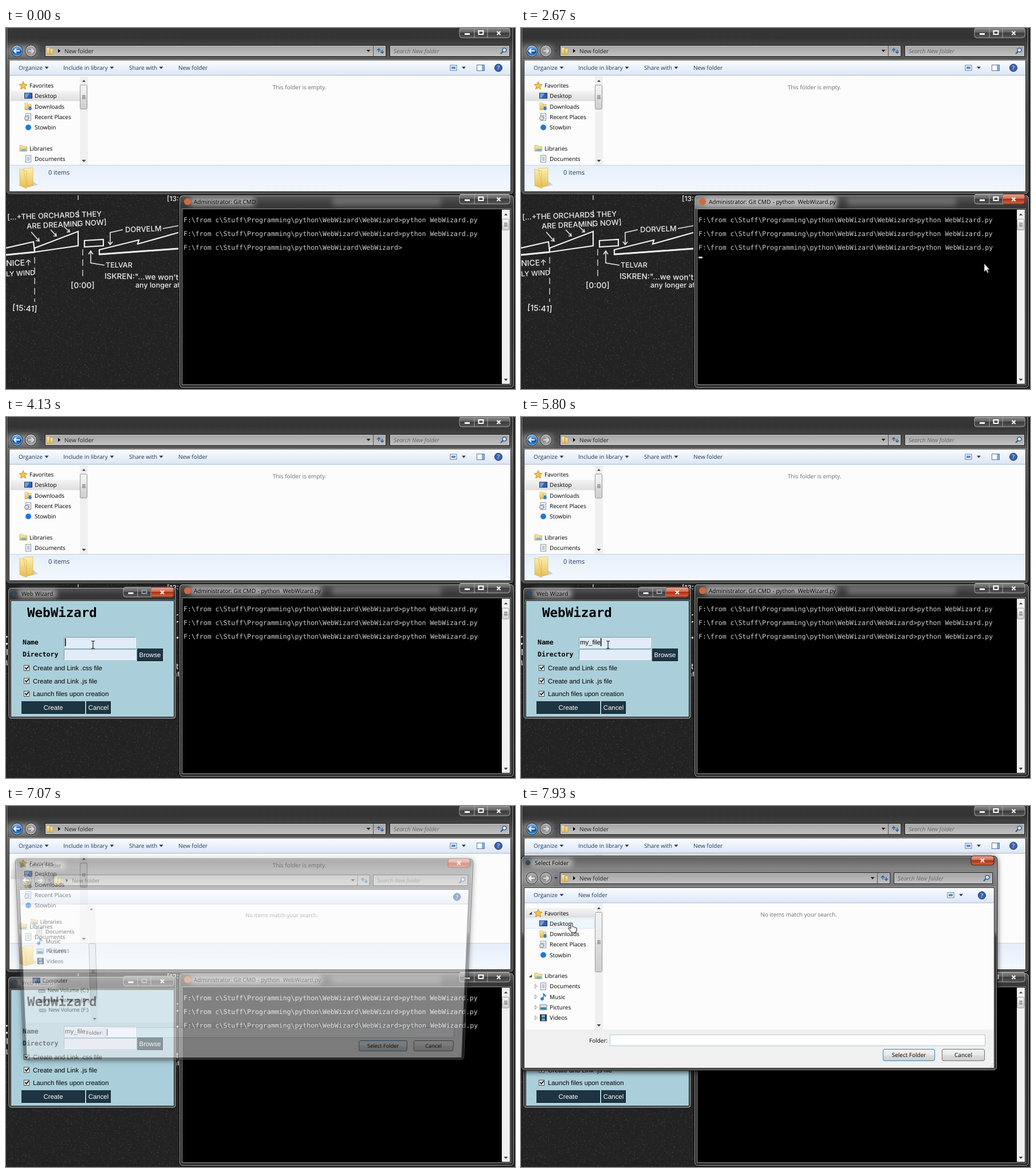
These frames come from a looping animation (889x630 px, 8000 ms). An HTML page:

```html
<!DOCTYPE html>
<html lang="en">
<head>
<meta charset="utf-8">
<title>Web Wizard demo</title>
<style>
html, body { margin: 0; width: 100%; height: 100%; overflow: hidden; background: #202020; }
div, svg { position: absolute; left: 0; top: 0; width: 889px; height: 630px; }
#wizard { transform-origin: 150.5px 412.5px; }
#dialog { transform-origin: 416px 274.5px; filter: drop-shadow(0 2px 5px #000b); }
text { font: 10px "Open Sans", "Noto Sans", sans-serif; white-space: pre; text-rendering: geometricPrecision; }
.mono { font: 11.54px "DejaVu Sans Mono", monospace; fill: #cfcfcf; }
.bold { font: bold 11.5px "DejaVu Sans Mono", monospace; }
.head { font: bold 22.5px "DejaVu Sans Mono", monospace; }
.tk { font: 11.35px "Liberation Sans", Arial, sans-serif; }
.hint { font-style: italic; fill: #666; }
.soft { fill: #6d6d6d; }
.bar { fill: #1e395b; }
.items { font-size: 10.9px; fill: #1e395b; }
.mid { text-anchor: middle; }
.white { fill: #fff; }
.chalk { font: 500 12px Inter, "Open Sans", sans-serif; fill: #eee; }
</style>
</head>
<body>
<svg id="desk"></svg>
<div id="wizard"></div>
<div id="dialog"></div>
<svg id="top"></svg>
<script>
const $ = id => document.getElementById(id);
const rect = (x, y, w, h, fill, more = '') =>
  `<rect x="${x}" y="${y}" width="${w}" height="${h}" fill="${fill}" ${more}/>`;
const path = (d, more = '') => `<path d="${d}" ${more}/>`;
const circle = (x, y, r, fill, more = '') => `<circle cx="${x}" cy="${y}" r="${r}" fill="${fill}" ${more}/>`;
const group = (id, body, more = '') => `<g id="${id}" ${more}>${body}</g>`;
// y is the vertical middle of the line
const text = (x, y, s, cls = '', more = '') =>
  `<text x="${x}" y="${y + 3.6}" class="${cls}" ${more}>${s}</text>`;
const line = (d, color = '#333', width = 1) =>
  path(d, `fill="none" stroke="${color}" stroke-width="${width}"`);
const grad = (id, ...stops) => `<linearGradient id="${id}" x2="0" y2="1">${stops.map(([o, c]) =>
  `<stop offset="${o}" stop-color="${c}"/>`).join('')}</linearGradient>`;
const down = (x, y, fill = '#1e395b') => path(`M${x - 3.5} ${y - 2}h7l-3.5 4z`, `fill="${fill}"`);
const up = (x, y) => path(`M${x - 3} ${y + 2}h6l-3 -3.5z`, 'fill="#444"');

const defs = `<defs>
${grad('dark', [0, '#3a3a3a'], [.08, '#333'], [.14, '#484848'], [.2, '#585858'], [.26, '#484848'], [.5, '#2c2c2c'], [1, '#303030'])}
${grad('pane', [0, '#5a5a5a'], [.05, '#3a3a3a'], [.1, '#333'], [.3, '#2a2a2a'], [1, '#303030'])}
${grad('mist', [0, '#5c5c5c'], [.06, '#858585'], [.15, '#777'], [.35, '#6a6a6a'], [.38, '#242424'], [1, '#1c1c1c'])}
${grad('field', [0, '#a4a4a4'], [1, '#c2c2c2'])}
${grad('tools', [0, '#fbfdff'], [.5, '#eaf1fa'], [1, '#dce6f4'])}
${grad('info', [0, '#e6effa'], [1, '#f3f8fe'])}
${grad('button', [0, '#f3f3f3'], [.5, '#e9e9e9'], [.52, '#dcdcdc'], [1, '#cfcfcf'])}
${grad('caption', [0, '#8a8a8a'], [.45, '#626262'], [.5, '#3c3c3c'], [1, '#555'])}
${grad('red', [0, '#e5aa9b'], [.45, '#cf6d55'], [.5, '#ae2e12'], [1, '#d26a45'])}
${grad('blue', [0, '#8fbcec'], [.5, '#2f6fc4'], [.52, '#1047a0'], [1, '#2f9be0'])}
${grad('grey', [0, '#b5b5b5'], [.5, '#8a8a8a'], [1, '#a9a9a9'])}
${grad('row', [0, '#f4f4f4'], [1, '#dedede'])}
${grad('folder', [0, '#fdf0b0'], [1, '#e5bd4f'])}
<filter id="blur" x="-20%" y="-100%" width="140%" height="300%"><feGaussianBlur stdDeviation="5"/></filter>
<filter id="grain" x="0" y="0" width="100%" height="100%"><feTurbulence baseFrequency=".3" numOctaves="2" seed="4"/>
<feColorMatrix values="0 0 0 0 1 0 0 0 0 1 0 0 0 0 1 .5 0 0 0 -.17"/></filter>
<clipPath id="navClip">${rect(6, 170, 123, 220, '#000')}</clipPath>
<clipPath id="listClip">${rect(6, 84, 123, 155, '#000')}</clipPath>
<clipPath id="titleClip">${rect(304, 293, 582, 23, '#000')}</clipPath>
</defs>`;

// ---- window parts ----
const frame = (x, y, w, h, fill) =>
  rect(x + .5, y + .5, w - 1, h - 1, fill, 'rx="6" stroke="#000"') +
  rect(x + 1.5, y + 1.5, w - 3, h - 3, 'none', 'rx="5" stroke="#fff" stroke-opacity=".55"');
// client area with the thin double edge of the glass around it
const client = (x, y, w, h, fill) =>
  rect(x - 1.5, y - 1.5, w + 3, h + 3, 'none', 'stroke="#fff" stroke-opacity=".4"') +
  rect(x - .5, y - .5, w + 1, h + 1, fill, 'stroke="#1a1a1a"');
const glow = (x, y, w) => rect(x, y - 7, w, 14, '#ccc', 'opacity=".75" filter="url(#blur)"');
const cross = (x, y) => line(`M${x - 3} ${y - 3}l6 6m0 -6l-6 6`, '#fff', 2);
function caption(x, y, a, b, w, closeId, faint) {
  return rect(x, y, w, 17, 'url(#caption)', 'rx="4" stroke="#bbb" stroke-opacity=".8"') +
    (closeId ? group(closeId, rect(x + b, y, w - b, 17, 'url(#red)', 'rx="3" stroke="#5a1508"')) : '') +
    line(`M${x + a} ${y}v17M${x + b} ${y}v17`, '#aaa') +
    rect(x + a / 2 - 4, y + 9, 9, 3, '#fff') +
    rect(x + (a + b) / 2 - 4, y + 5, 8, 6, 'none', `stroke="${faint ? '#999' : '#fff'}" stroke-width="2"`) +
    cross(x + (b + w) / 2, y + 9);
}
const smallFolder = (x, y) => path(`M${x - 5} ${y - 6}h5v12h-5zM${x + 1} ${y - 4}h5v10h-5z`, 'fill="url(#folder)" stroke="#b48a2c" stroke-width=".5"');

function address(y, end, right, back) {
  const nav = (x, fill) => circle(x, y, 10, fill, 'stroke="#222" stroke-width="1"') +
    circle(x, y, 9, 'none', 'stroke="#ddd" stroke-opacity=".7"');
  return rect(4, y - 9, 50, 18, '#bbb', 'opacity=".6" filter="url(#blur)"') +
    nav(19, back) + nav(43.5, 'url(#grey)') +
    line(`M24 ${y}h-10m4 -4l-4 4l4 4`, '#fff', 2.2) +
    line(`M39 ${y}h9m-4 -4l4 4l-4 4`, '#ddd', 2.2) +
    down(61, y, '#244a80') +
    rect(68.5, y - 9.5, end - 69, 19, 'url(#field)', 'stroke="#222"') +
    rect(69.5, y - 8.5, end - 71, 17, 'none', 'stroke="#ddd" stroke-opacity=".7"') +
    line(`M${end - 22.5} ${y - 9}v18`, '#555') +
    smallFolder(76, y) + path(`M91 ${y - 3.5}v7l4 -3.5z`) +
    text(102, y, 'New folder', '', 'fill="#222"') + down(end - 31, y, '#222') +
    line(`M${end - 16} ${y - 1}l3 -3l3 3m-3 -3v6M${end - 10} ${y + 1}l3 3l3 -3m-3 3v-6`, '#2b62a5', 1.5) +
    rect(end + 6.5, y - 9.5, right - end - 7, 19, 'url(#field)', 'stroke="#222"') +
    rect(end + 7.5, y - 8.5, right - end - 9, 17, 'none', 'stroke="#ddd" stroke-opacity=".7"') +
    text(end + 13, y, 'Search New folder', 'hint') +
    circle(right - 9.5, y - 1.5, 3.4, '#dbe8f5', 'stroke="#2a5592" stroke-width="1.4"') +
    line(`M${right - 12} ${y + 1}l-4 4`, '#2a5592', 2);
}
const toolbar = (y, right, help) => rect(6, y - 13, right - 6, 26, 'url(#tools)') +
  line(`M6 ${y + 13}h${right - 6}`, '#a9bbd2') +
  circle(help, y, 6.5, '#3a62b0', 'stroke="#1b2f63"') + text(help, y, '?', 'mid white', 'font-weight="bold"');
const menu = (y, items, view) =>
  items.map(([x, s, arrow]) => text(x, y, s, 'bar') + (arrow ? down(arrow, y) : '')).join('') +
  rect(view - 5, y - 4.5, 11, 9, '#fff', 'stroke="#5c7596"') + rect(view - 3, y - 2, 7, 4, '#4a8ad0') +
  down(view + 18.5, y);
const paper = (x, y) => rect(x - 4.5, y - 6, 9, 12, '#fbfbfb', 'stroke="#8a8f99"') +
  line(`M${x - 2.5} ${y - 2.5}h5m-5 2.5h5m-5 2.5h5`, '#5d87b8');
const screen = (x, y) => rect(x - 6.5, y - 5, 13, 9, '#2a62bd', 'stroke="#1f2d4a"') +
  path(`M${x - 6} ${y - 4.5}h8l-5 8h-3z`, 'fill="#6fa0e4"');
const wide = (x, y) => path(`M${x - 6} ${y - 5}h5l1.5 2h6v8h-12.5z`, 'fill="url(#folder)" stroke="#b48a2c" stroke-width=".6"');
const icons = {
  Favorites: (x, y) => path(`M${x} ${y - 7}l2 4.6l5 .5l-3.8 3.3l1.2 5l-4.4 -2.7l-4.4 2.7l1.2 -5l-3.8 -3.3l5 -.5z`, 'fill="#f8c63c" stroke="#b9791a" stroke-width=".8"'),
  Desktop: screen,
  Downloads: (x, y) => smallFolder(x - 1, y) + path(`M${x + 1} ${y}h4v3h2l-4 4l-4 -4h2z`, 'fill="#2f7fd6"'),
  'Recent Places': (x, y) => paper(x, y) + circle(x - 3, y + 2, 3.5, '#dfe3e8', 'stroke="#777"'),
  Stowbin: (x, y) => circle(x, y, 5, '#1f78e0'),
  Libraries: (x, y) => wide(x, y) + rect(x - 3, y + 1, 8, 4, '#6fb4e6'),
  Documents: paper,
  Music: (x, y) => circle(x - 2, y + 3.5, 3, '#2f86d8') + path(`M${x - .5} ${y - 7}l5 4v4l-3.5 -3v6h-1.5z`, 'fill="#2f86d8"'),
  Pictures: (x, y) => rect(x - 6, y - 4.5, 12, 9, '#cfe6f6', 'stroke="#7d8b99"') + rect(x - 5, y, 10, 4, '#3f8a86'),
  Videos: (x, y) => rect(x - 6, y - 6, 12, 12, '#2b3340') + rect(x - 3, y - 5, 6, 4.5, '#6ea6d6') + rect(x - 3, y + 1, 6, 4, '#6ea6d6'),
  Computer: screen,
  drive: (x, y) => rect(x - 6, y - 1, 12, 5, '#b8bec6', 'rx="1" stroke="#666"')
};
// empty names leave a gap; headings sit further left
const heads = ['Favorites', 'Libraries', 'Computer'];
const favs = ['Favorites', 'Desktop', 'Downloads', 'Recent Places', 'Stowbin', ''];
const libs = ['Libraries', 'Documents', 'Music', 'Pictures', 'Videos'];
const tree = (y0, names) => names.map((s, i) => {
  if (!s) return '';
  const y = y0 + i * 18.25, head = heads.includes(s);
  return (icons[s] || icons.drive)(head ? 30 : 39, y) + text(head ? 41 : 50, y, s);
}).join('');
const scroll = (x, y, h, at, len, id = '') => rect(x, y, 14, h, '#f0f0f0') + up(x + 7, y + 8) + down(x + 7, y + h - 7, '#444') +
  group(id, rect(x + .5, at + .5, 12, len, 'url(#button)', 'rx="2" stroke="#999"') +
    line(`M${x + 4} ${at + len / 2 - 2}h6m-6 2.5h6m-6 2.5h6`, '#555'));

// ---- desktop ----
const say = (x, y, s, size, turn = 0) => text(x, y, s, 'chalk', `style="font-size:${size}px" transform="rotate(${turn} ${x} ${y})"`);
const wallpaper = rect(0, 0, 889, 630, '#222') + rect(0, 288, 304, 342, '#fff', 'filter="url(#grain)" opacity=".6"') +
  say(2, 331, '[...+THE ORCHARDS THEY', 13, -2) + say(36, 347, 'ARE DREAMING NOW]', 13, -3) +
  say(281, 298, '[13:', 12) + say(208, 353, 'DORVELM', 13, -2) + say(174, 414, 'TELVAR', 12.5) +
  say(172, 434, 'ISKREN:"...we won\'t', 13.5, 1) + say(226, 449, 'any longer at', 12.5) +
  say(0, 412, 'NICE↑', 14, -2) + say(0, 430, 'LY WIND', 12, -3) +
  say(113, 450, '[0:00]', 14) + say(11, 489, '[15:41]', 14, 4) +
  line('M0 384L48 373L50 391L0 396M50 384L126 355V380L50 391ZM137 371L170 369V380L137 382ZM301 385L163 395V387L232 370L230 377L301 357', '#eee', 2.2) +
  line('M0 396L50 391M163 395L301 385', '#eee', 3) +
  line('M274 350L301 345M204 352L182 357V378m-4 -5l4 5l4 -5M172 414L148 410V389m-4 6l4 -6l4 6M44 356l14 16m-1 -6l1 6l-6 -1M78 352l10 11m-1 -5l1 5l-5 0M102 347l9 9m-1 -5l1 5l-5 0', '#e4e4e4', 1.6) +
  path('M126 292V300M126 318V352M50 400V478M134 386V440', 'stroke="#ccc" stroke-width="1.5" stroke-dasharray="11 7"');

const explorer = frame(0, -8, 887, 299, 'url(#dark)') + caption(792, 0, 26, 49, 88) +
  address(40, 664, 880, 'url(#blue)') + client(6, 57, 875, 228, '#fcfcfc') +
  toolbar(69.5, 881, 860) +
  menu(69.5, [[22, 'Organize', 71], [100, 'Include in library', 185], [215, 'Share with', 271], [301, 'New folder']], 781) +
  rect(822.5, 64.5, 13, 10, '#fff', 'stroke="#5c7596"') + rect(831, 65, 4, 9, '#7fb0e0') +
  rect(7, 109.5, 122, 18, 'url(#row)') +
  `<g clip-path="url(#listClip)">${tree(100.5, [...favs, ...libs])}</g>` + scroll(129, 84, 155, 99, 42) +
  text(512.5, 103, 'This folder is empty.', 'soft mid') +
  rect(6, 239, 875, 46, 'url(#info)') + line('M6 239.5h875', '#c5d3e6') +
  path('M36 278L56 274L46 266z', 'fill="#ccd0d4"') +
  path('M30 245l17 -1v31l-10 3zM24 246l12 4v30l-12 -5z', 'fill="url(#folder)" stroke="#d6ae4a" stroke-width=".6"') +
  text(74, 252, '0 items', 'items');

const prompt = 'F:\\from c\\Stuff\\Programming\\python\\WebWizard\\WebWizard&gt;', command = 'python WebWizard.py';
const terminal = frame(302, 291, 586, 338, 'url(#pane)') +
  `<g clip-path="url(#titleClip)">${rect(570, 296, 190, 14, '#999', 'opacity=".5" filter="url(#blur)"')}${
    group('lit', rect(300, 293, 250, 24, '#ddd', 'opacity=".55" filter="url(#blur)"'))}${
    glow(322, 303, 112)}${group('wideGlow', glow(430, 303, 120))}</g>` +
  circle(317, 303, 6, '#cf6a3c') + text(328, 303, 'Administrator: Git CMD') +
  text(437, 303, ' - python  WebWizard.py', '', 'id="running"') +
  caption(792, 290, 26, 49, 88, 'cmdClose') +
  client(309, 317, 571, 304, '#000') + scroll(866, 317, 304, 333, 19) +
  [335, 359.4].map(y => text(310, y, prompt + command, 'mono')).join('') + text(310, 383.8, prompt, 'mono') +
  text(692.3, 383.8, command, 'mono', 'id="typed"') + rect(0, 0, 7, 3, '#d2d2d2', 'id="block"');

// ---- pop-up windows ----
const check = (y, s) => rect(31.5, y - 4.5, 9, 9, '#fff', 'stroke="#444"') +
  line(`M33.5 ${y - 1}l2 3l4 -5`, '#000', 1.8) + text(47, y + .4, s, 'tk');
const dark = (x, y, w, s) => rect(x, y, w, 22, '#1d3442') + line(`M${x} ${y + 21.5}h${w - .5}v-21`, '#0c1a22') +
  text(x + w / 2, y + 11.3, s, 'tk mid white');
const entry = y => rect(101.5, y, 125, 18, '#e2ebf7', 'stroke="#f7fafc"') + line(`M101.5 ${y + 18}v-18h125`, '#7c98a2');
const wizard = frame(3, 297, 295, 231, 'url(#pane)') + glow(22, 308, 66) +
  circle(15, 308, 4.5, '#31475e') + text(27, 308, 'Web Wizard') + caption(205, 297, 25, 48, 88, 'wizClose', true) +
  client(9, 321, 284, 202, '#abcfda') +
  `<text x="37" y="349" class="head">WebWizard</text>` +
  text(29, 393, 'Name', 'bold') + text(29, 414, 'Directory', 'bold') + entry(384.5) + entry(405.5) +
  text(103, 393.6, '', 'tk', 'id="name"') + rect(103, 386, 1.5, 14, '#000', 'id="caret"') +
  dark(229, 404, 45, 'Browse') +
  check(438, 'Create and Link .css file') + check(460.5, 'Create and Link .js file') +
  check(483, 'Launch files upon creation') + dark(27, 496, 111, 'Create') + dark(140, 496, 43, 'Cancel');

const push = (x, w, s, stroke) => rect(x + .5, 424.5, w, 20, 'url(#button)', `rx="2.5" stroke="${stroke}"`) +
  text(x + w / 2 + .5, 434.5, s, 'mid');
const opener = (x, y) => path(`M${x} ${y + 2.5}h5v-5z`, 'fill="#333"');
const closed = y => path(`M24.5 ${y - 3.5}v7l4 -3.5z`, 'fill="#fff" stroke="#999"');
const dialog = frame(0, 87, 832, 375, 'url(#mist)') + glow(18, 99, 72) +
  circle(12, 99, 4.5, '#31475e') + text(24, 99, 'Select Folder') +
  rect(786, 87, 40, 16, 'url(#red)', 'rx="4" stroke="#5a1508"') + cross(806, 95) +
  address(126, 645, 824, 'url(#grey)') + client(6, 143, 820, 314, '#fcfcfc') +
  toolbar(156, 826, 805) +
  group('menu', menu(155.5, [[22, 'Organize', 71], [100, 'New folder']], 750)) +
  group('late', rect(7, 178, 121, 17, 'url(#row)') +
    group('hover', rect(7.5, 196.5, 120, 17, '#eef6fe', 'stroke="#d3e6f8"')) +
    tree(187, [...favs, ...libs])) +
  group('early', tree(201, [...libs, '', 'Computer', 'New Volume (C:)', 'New Volume (D:)', 'New Volume (F:)']), 'clip-path="url(#navClip)"') +
  group('arrows', opener(14, 187) + opener(14, 296.5) + [1, 2, 3, 4].map(i => closed(296.5 + i * 18.25)).join('')) +
  scroll(129, 170, 220, 185, 104, 'thumb') +
  text(485, 189, 'No items match your search.', 'soft mid') +
  rect(6, 390, 820, 67, '#f0f0f0') + text(119, 409, 'Folder:') +
  rect(155.5, 399.5, 655, 19, '#fff', 'stroke="#a9cbe0"') + rect(158, 402, 1.2, 13, '#000', 'id="folderCaret"') +
  push(632, 90, 'Select Folder', '#3c7fb1') + push(735, 74, 'Cancel', '#707070') +
  path('M823 449v6h-6', 'fill="none" stroke="#aaa" stroke-dasharray="1.5 1.5"');

const pointers = group('arrow', path('M0 0V14.5L3.3 11.4L5.5 16.5L7.6 15.6L5.4 10.6H9.5Z', 'fill="#fff" stroke="#222" stroke-width=".7"')) +
  group('beam', line('M-3 -6.5h2l1 1l1 -1h2M0 -5.5V5.5M-3 6.5h2l1 -1l1 1h2', '#111', 1.1)) +
  group('hand', path('M0 1q1.5 -2 3 0V7q1.5 -1 2.5 .5q2 -.8 2.5 .8q2 -.5 2.2 1.5V13l-2 4H1.5L-4 10q0 -2 2 -1.5L0 10Z', 'fill="#fff" stroke="#111"'));

$('desk').innerHTML = defs + wallpaper + explorer + terminal;
$('wizard').innerHTML = `<svg>${wizard}</svg>`;
$('dialog').innerHTML = `<svg>${dialog}</svg>`;
$('top').innerHTML = pointers;

// ---- motion ----
const show = (id, on) => { $(id).style.display = on ? '' : 'none'; };
const within = (t, ...spans) => spans.some(([a, b]) => t >= a && t < b);
// time, x, y, shape; an empty shape hides the pointer until the next key
const route = [
  [0, 874, 610, ''], [200, 874, 610, 'arrow'], [269, 874, 610, 'arrow'], [270, 136, 559, 'arrow'], [330, 136, 559, ''],
  [870, 194, 483, 'arrow'], [1000, 330, 345, 'arrow'], [1130, 500, 230, 'arrow'], [1300, 690, 335, 'arrow'],
  [1470, 809, 411, 'arrow'], [3130, 809, 411, 'arrow'], [3470, 240, 418, 'arrow'], [3530, 222, 415, 'beam'],
  [3800, 155, 413, 'beam'], [4000, 155, 413, 'beam'], [4130, 152, 397.5, 'beam'], [6330, 152, 397.5, 'beam'],
  [6460, 228, 408, 'arrow'], [6530, 255, 415, 'arrow'], [6800, 255, 415, ''],
  [7530, 140, 385, 'arrow'], [7700, 112, 290, 'arrow'], [7870, 90, 209, 'hand'], [7930, 87, 204, 'hand'], [8000, 87, 204, 'hand']
];
const keys = [[4730, 'm'], [4870, 'y'], [5130, '_'], [5270, 'f'], [5530, 'i'], [5670, 'l'], [5800, 'e']];

// windows fade in while tilting and growing to full size
function open(id, t, start) {
  const left = Math.pow(1 - Math.min(1, Math.max(0, (t - start) / 420)), 1.5);
  const s = $(id).style;
  show(id, left < 1);
  s.opacity = 1 - left;
  s.transform = left ? `translateY(${-7 * left}px) perspective(1000px) rotateX(${-13.3 * left}deg) scale(${1 - .117 * left})` : 'none';
}
function movePointer(t) {
  const i = route.findLastIndex(k => k[0] <= t);
  const [t0, x0, y0, shape] = route[i], [t1, x1, y1] = route[i + 1] || route[i];
  const p = t1 > t0 ? (t - t0) / (t1 - t0) : 0;
  for (const id of ['arrow', 'beam', 'hand']) show(id, id === shape);
  if (shape) $(shape).setAttribute('transform', `translate(${x0 + (x1 - x0) * p} ${y0 + (y1 - y0) * p})`);
}
function draw(now) {
  const t = now % 8000, ran = t >= 2670, active = within(t, [1670, 2800]);
  show('cmdClose', active);
  show('lit', active);
  show('typed', t >= 2400);
  show('running', ran);
  show('wideGlow', ran);
  show('block', within(t, [2130, 2400], [2670, 2800]));
  $('block').setAttribute('x', ran ? 310 : 692);
  $('block').setAttribute('y', ran ? 399 : 387);

  open('wizard', t, 2710);
  show('wizClose', t < 6870);
  const name = keys.filter(k => k[0] <= t).map(k => k[1]).join('');
  $('name').textContent = name;
  show('caret', within(t, [2700, 3330], [3730, 4330], [4670, 6130], [6430, 6600]));
  $('caret').setAttribute('x', 103 + (name ? $('name').getComputedTextLength() : 0));

  open('dialog', t, 6910);
  const late = t >= 7135;
  show('late', late);
  show('menu', late);
  show('early', !late);
  $('thumb').setAttribute('transform', `translate(0 ${late ? 0 : 56})`);
  show('folderCaret', t < 7530);
  show('hover', t >= 7870);
  $('arrows').style.opacity = Math.min(1, Math.max(0, (t - 7530) / 250));
  movePointer(t);
}
const begin = performance.now();
function tick() {
  draw(performance.now() - begin);
  requestAnimationFrame(tick);
}
tick();
</script>
</body>
</html>
```
